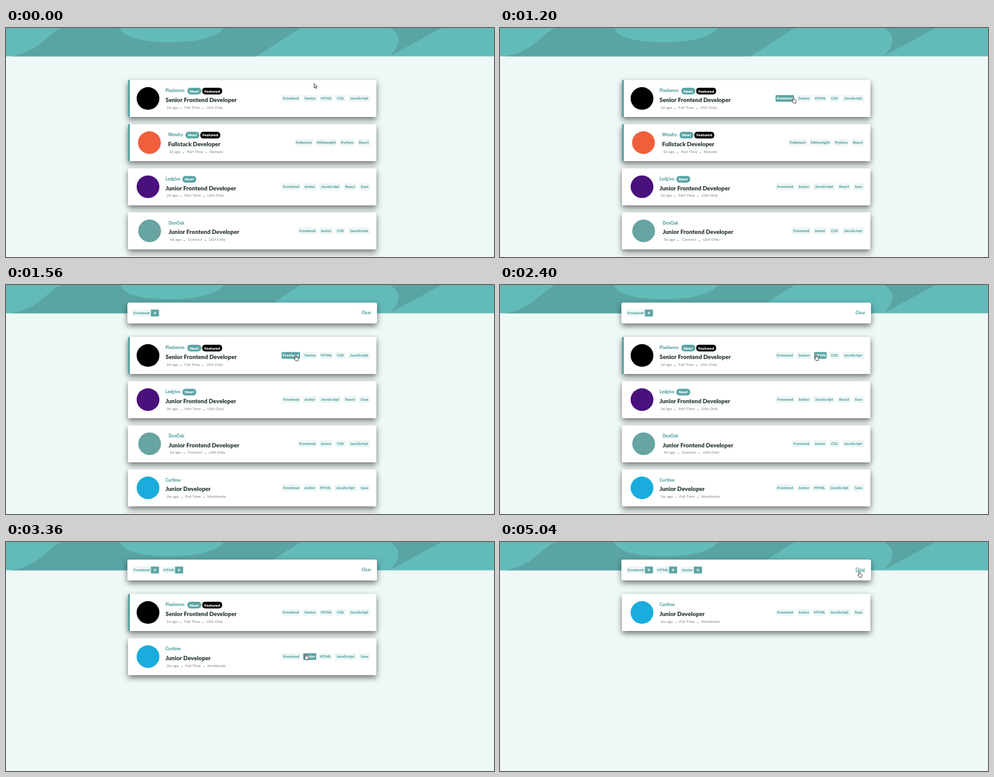
These frames come from a looping animation (780 by 368 pixels, 5400 ms). An HTML page with a canvas:

```html
<!DOCTYPE html>
<html lang="en">
<head>
<meta charset="utf-8">
<title>Job listings</title>
<style>
html, body { margin: 0; width: 100%; height: 100%; overflow: hidden; background: #eef8f7; }
canvas { display: block; }
</style>
</head>
<body>
<canvas id="stage" width="780" height="368"></canvas>
<script>
const ctx = document.getElementById('stage').getContext('2d');
const LOOP = 5400, STEP = 120;
const TEAL = '#5ba4a4', LIGHT = '#62bbb9', PALE = '#ecf6f5', INK = '#2b3939', GREY = '#748585';

const tagWidth = {
  Frontend: 29.5, Senior: 23, HTML: 20, CSS: 16, JavaScript: 35, Fullstack: 29,
  Midweight: 34, Python: 24, React: 20, Sass: 17.5, Junior: 21
};

const jobs = [
  { name: 'Pixelwren', color: '#000', x: 255, logoX: 227, badgeX: 290, featured: true,
    title: 'Senior Frontend Developer', meta: ['1d ago', 'Full Time', 'USA Only'],
    tags: ['Frontend', 'Senior', 'HTML', 'CSS', 'JavaScript'] },
  { name: 'Wendry', color: '#f05f3c', x: 259, logoX: 229.3, badgeX: 287, featured: true,
    title: 'Fullstack Developer', meta: ['1d ago', 'Part Time', 'Remote'],
    tags: ['Fullstack', 'Midweight', 'Python', 'React'] },
  { name: 'Ledgivo', color: '#4a107c', x: 255, logoX: 227, badgeX: 282,
    title: 'Junior Frontend Developer', meta: ['2d ago', 'Part Time', 'USA Only'],
    tags: ['Frontend', 'Junior', 'JavaScript', 'React', 'Sass'] },
  { name: 'DenOak', color: '#67a4a2', x: 260, logoX: 229.6,
    title: 'Junior Frontend Developer', meta: ['5d ago', 'Contract', 'USA Only'],
    tags: ['Frontend', 'Junior', 'CSS', 'JavaScript'] },
  { name: 'Curtlow', color: '#1aacdc', x: 255, logoX: 227,
    title: 'Junior Developer', meta: ['2w ago', 'Full Time', 'Worldwide'],
    tags: ['Frontend', 'Junior', 'HTML', 'JavaScript', 'Sass'] }
];

const clicks = [[1440, 'Frontend'], [2520, 'HTML'], [3840, 'Junior']];

// Pointer path: time, x, y
const path = [
  [0, 492.5, 89], [600, 488, 95], [1200, 469, 111.5], [1560, 463, 112.5], [1800, 463, 112.5],
  [2400, 505, 112], [2760, 505, 112], [3360, 479, 179.8], [3480, 479, 179.8], [3600, 482, 184],
  [3960, 482, 184], [4200, 538.5, 88], [4440, 538.5, 88], [4560, 577, 48.5], [4680, 577, 48.5],
  [5040, 574.2, 47.5], [LOOP, 574.2, 47.5]
];

const arrow = new Path2D('M0 0V7.2L1.7 5.8L2.9 8.3L4.1 7.7L2.9 5.3H5Z');
const hand = new Path2D('M-.9 .8Q0-.7.9.8V3.4L3.6 4Q4.6 4.4 4.4 5.8L3.7 9.4H.2L-2.3 6Q-2.2 4.9-.9 5.8Z');
const waves = new Path2D(
  'M88 0C66 10 52 39 8 45.5H400L471 0H348C338 16 300 23 262 23C222 23 186 16 183 0Z' +
  'M614 0C633 12 631 28 613 45.5L696 0Z');

function pointerAt(t) {
  const i = path.findIndex(p => p[0] > t);
  const [t0, x0, y0] = path[i - 1], [t1, x1, y1] = path[i];
  const k = (t - t0) / (t1 - t0);
  return { x: x0 + (x1 - x0) * k, y: y0 + (y1 - y0) * k };
}

function box(x, y, w, h, color, radius = 1) {
  ctx.fillStyle = color;
  ctx.beginPath();
  ctx.roundRect(x, y, w, h, radius);
  ctx.fill();
}

function panel(x, y, w, h, radius) {
  ctx.save();
  ctx.shadowColor = 'rgba(0,0,0,.55)';
  ctx.shadowBlur = 10;
  ctx.shadowOffsetY = 4;
  box(x, y, w, h, '#fff', radius);
  ctx.restore();
}

function text(str, x, y, size, weight, color, align = 'left') {
  ctx.font = `${weight} ${size}px Lato, sans-serif`;
  ctx.fillStyle = color;
  ctx.textAlign = align;
  ctx.fillText(str, x, y);
  return ctx.measureText(str).width;
}

function chip(label, x, y, w, bg, color, radius) {
  box(x, y - 5.4, w, 10.8, bg, radius);
  text(label, x + w / 2, y + 2.2, 6.3, 900, color, 'center');
}

const inside = (p, x, y, w, h) => p.x >= x && p.x <= x + w && p.y >= y && p.y <= y + h;
const cardY = row => 83.6 + 70.9 * row;

function drawCard(job, row, pointer) {
  const y = cardY(row);
  panel(195, y, 397, 59.5, 1);
  if (job.featured) box(195, y, 3, 59.5, TEAL, [1, 0, 0, 1]);

  ctx.fillStyle = job.color;
  ctx.beginPath();
  ctx.arc(job.logoX, y + 29.7, 18.2, 0, Math.PI * 2);
  ctx.fill();

  text(job.name, job.x, y + 19.7, 6.7, 900, TEAL);
  if (job.badgeX) chip('New!', job.badgeX, y + 17.7, 22, TEAL, '#fff', 5);
  if (job.featured) chip('Featured', job.badgeX + 23.5, y + 17.7, 32, '#000', '#fff', 5);
  text(job.title, job.x, y + 35.1, 9.4, 900, INK);

  let x = job.x + 1.5;
  job.meta.forEach((part, i) => {
    if (i) text('.', x - 5.3, y + 46, 7, 900, INK, 'center');
    x += text(part, x, y + 46, 6.2, 400, GREY) + 10.3;
  });

  let hovered = false;
  x = 582;
  for (const tag of [...job.tags].reverse()) {
    const w = tagWidth[tag];
    x -= w;
    const over = inside(pointer, x, y + 24, w, 11);
    chip(tag, x, y + 29.6, w, over ? TEAL : PALE, over ? '#fff' : TEAL);
    hovered ||= over;
    x -= 4.5;
  }
  return hovered;
}

function drawFilters(picked, pointer) {
  panel(194, 28.3, 399, 33.4, 3);
  let x = 202;
  for (const tag of picked) {
    const w = tagWidth[tag];
    chip(tag, x, 45, w, PALE, TEAL, [1, 0, 0, 1]);
    chip('X', x + w, 45, 13, TEAL, '#fff', [0, 1, 1, 0]);
    x += w + 18.7;
  }
  text('Clear', 576, 47, 6.5, 900, TEAL, 'center');
  const over = inside(pointer, 566, 38, 20, 14);
  if (over) box(568, 47.5, 16, .8, TEAL, 0);
  return over;
}

function draw(t) {
  const pointer = pointerAt(t);
  const picked = clicks.filter(c => t >= c[0]).map(c => c[1]);
  const shown = jobs.filter(job => picked.every(tag => job.tags.includes(tag)));

  ctx.fillStyle = '#eef8f7';
  ctx.fillRect(0, 0, 780, 368);
  ctx.fillStyle = LIGHT;
  ctx.fillRect(0, 0, 780, 45.5);
  ctx.fillStyle = TEAL;
  ctx.fill(waves);

  // Trace of the card that was just removed
  if (t >= 3840 && t < 4080) {
    ctx.strokeStyle = 'rgba(60,90,80,.035)';
    ctx.lineWidth = 4;
    ctx.beginPath();
    ctx.roundRect(190, 152, 408, 75, 14);
    ctx.stroke();
  }

  let hovered = false;
  shown.slice(0, 4).forEach((job, row) => {
    if (drawCard(job, row, pointer)) hovered = true;
  });
  if (shown.length >= 4) panel(195, cardY(4), 397, 59.5, 1);
  if (picked.length && drawFilters(picked, pointer)) hovered = true;

  ctx.save();
  ctx.translate(pointer.x, pointer.y);
  ctx.fillStyle = '#fff';
  ctx.strokeStyle = '#222';
  ctx.lineWidth = .8;
  const shape = hovered ? hand : arrow;
  ctx.fill(shape);
  ctx.stroke(shape);
  ctx.restore();
}

const start = performance.now();
function tick() {
  const t = (performance.now() - start) % LOOP;
  draw(Math.floor(t / STEP) * STEP);
  requestAnimationFrame(tick);
}
tick();
</script>
</body>
</html>
```
